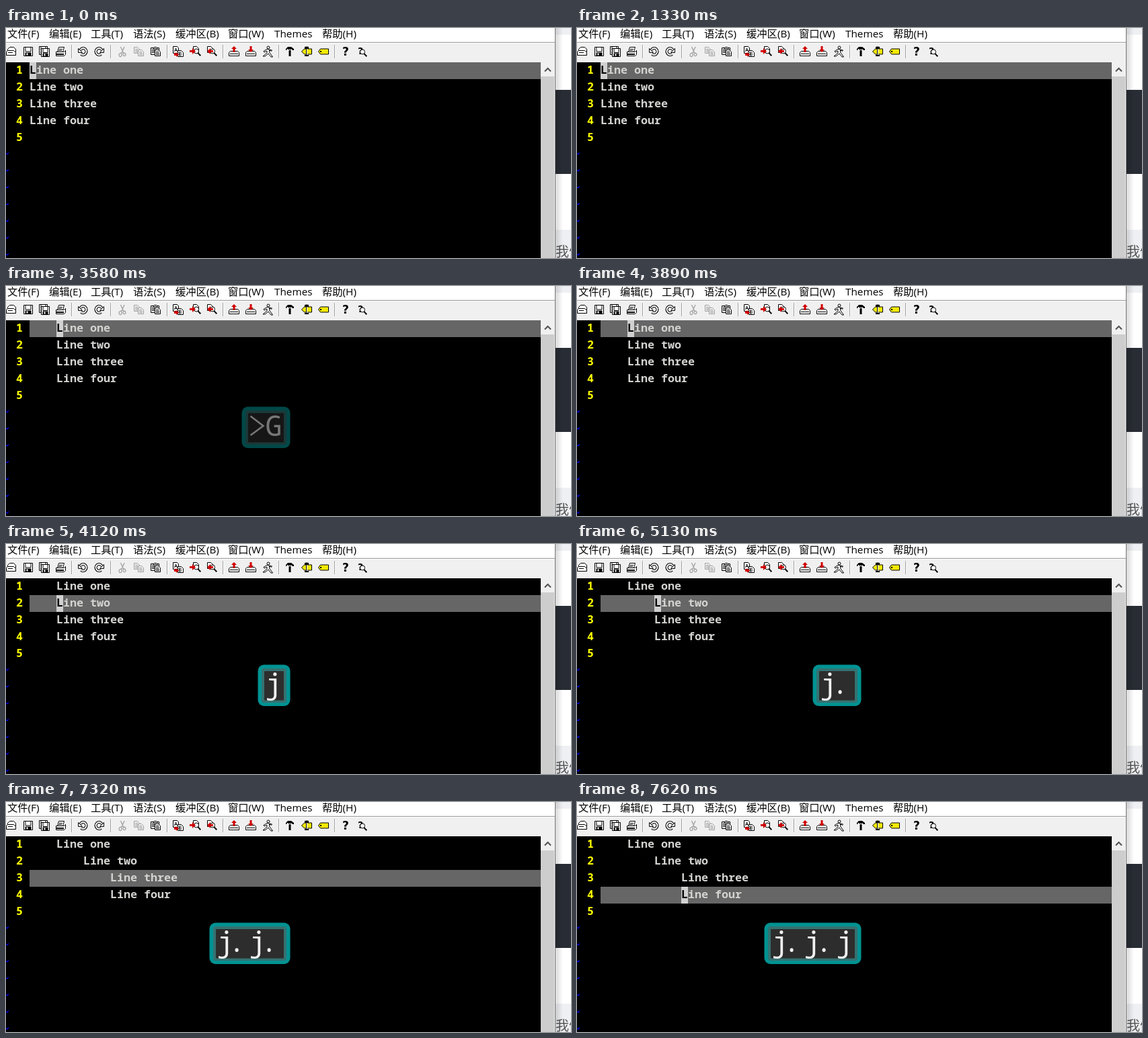
Animation, 840 px wide and 342 px high, one loop 8 s. Source, as an HTML page with a canvas:

```html
<!DOCTYPE html>
<html lang="zh">
<head>
<meta charset="utf-8">
<style>
html, body { margin: 0; width: 100%; height: 100%; overflow: hidden; background: #000; }
canvas { display: block; }
</style>
</head>
<body>
<canvas id="stage" width="840" height="342"></canvas>
<script>
const ctx = document.getElementById('stage').getContext('2d');
const LOOP = 8000, COL = 10, ROW = 25, TOP = 51, LEFT = 35, RIGHT = 795;
const MONO = '"Noto Sans Mono", "DejaVu Sans Mono", monospace';
const UI = '"Open Sans", "Noto Sans CJK SC", "Noto Sans CJK JP", "Noto Sans CJK", sans-serif';
const LINES = ['Line one', 'Line two', 'Line three', 'Line four'];
const MENU = [[2, '文件(F)'], [64, '编辑(E)'], [126, '工具(T)'], [189, '语法(S)'],
  [252, '缓冲区(B)'], [330, '窗口(W)'], [399, 'Themes'], [470, '帮助(H)']];

const KEYS = [[1400, '>'], [2350, 'G'], [4120, 'j'], [5130, '.'], [5910, 'j'], [6610, '.'], [7620, 'j']];
const BLINKS = [[380, 610], [1080, 1330], [2100, 2350], [3050, 3280],
  [3660, 3890], [4810, 5060], [5830, 5910], [7320, 7540]];
const FADE = [[3280, .95], [3350, .83], [3430, .67], [3580, .5], [3660, .25], [3740, 0]];

function rect(x, y, w, h, color) {
  ctx.fillStyle = color;
  ctx.fillRect(x, y, w, h);
}

function text(str, x, y, font, color, align = 'left') {
  ctx.font = font;
  ctx.fillStyle = color;
  ctx.textAlign = align;
  ctx.fillText(str, x, y);
}

// Each part is [path, fill, stroke, width] in a 16 px box centred on x
function icon(x, ...parts) {
  ctx.save();
  ctx.translate(x - 8, 27);
  for (const [d, fill, stroke, width = 1] of parts) {
    const p = new Path2D(d);
    ctx.lineWidth = width;
    if (fill) { ctx.fillStyle = fill; ctx.fill(p); }
    if (stroke) { ctx.strokeStyle = stroke; ctx.stroke(p); }
  }
  ctx.restore();
}

function mirrored(x, ...parts) {
  ctx.save();
  ctx.translate(2 * x, 0);
  ctx.scale(-1, 1);
  icon(x, ...parts);
  ctx.restore();
}

const K = '#000', W = '#fff', R = '#d00000', Y = '#f4ea00', G = '#a0a0a0';
const sheet = (x, y) => `M${x} ${y}h5l3 3v6h-8z`;
const floppy = (x, y, s) => [
  [`M${x} ${y}h${s}v${s}h-${s}z`, W, K],
  [`M${x + 2.5} ${y}v${s / 2}h${s - 5}v-${s / 2}`, null, K],
  [`M${x + 2} ${y + s - 5}h${s - 4}v5h-${s - 4}z`, K],
  [`M${x + 4} ${y + s - 4}h2v3h-2z`, W]
];
const lens = (x, y) => [
  [`M${x} ${y}a3.5 3.5 0 1 0 7 0a3.5 3.5 0 1 0 -7 0z`, W, K],
  [`M${x + 5} ${y + 3}l1.5 -1l4 4l-1.5 1.5z`, K]
];
const tray = ['M.5 9.5l2-2h11l2 2v5h-15z', W, K];
const hook = 'M4.5 5.5q3-4 7-1.5q4 4 0 8q-3 2-6 0';
const turn = [[hook, null, K, 4], [hook, null, W, 1.8], ['M1.5 3.5v6h6z', W, K]];

function toolbar(pending) {
  const paste = pending ? G : K;
  icon(8, ['M2.5 7.5v-3l3-3h6l3 3v9', W, K], ['M.5 13.5v-5l2-2h9l3 3v4z', W, K],
    ['M3 9.5h7', null, K]);
  icon(33, ...floppy(1.5, 1.5, 13));
  icon(57, ...floppy(.5, .5, 12), ...floppy(3.5, 3.5, 12));
  icon(81, ['M3.5 8.5l2-7h8l-2 7z', W, K], ['M1.5 8.5h12l2-2v6l-2 2h-12z', W, K],
    ['M2 11h11v2h-11z', K], ['M6 4.5h5M5 6.5h5', null, K]);
  icon(114, ...turn);
  mirrored(139, ...turn);
  icon(173, ['M5.5 1l4 9M11 1l-4 9M4 11a2 2.5 0 1 0 3 2q0-2-1-3zM10 10a2 2.5 0 1 0 3 2q-1-2-3-2z', null, G, 1.3]);
  icon(198, [sheet(.5, 1.5), '#f0f0f0', G], [sheet(6.5, 5.5), '#f0f0f0', G],
    ['M2 4.5h4M2 6.5h4M2 8.5h4M8 8.5h4M8 10.5h5M8 12.5h5', null, G]);
  icon(223, ['M.5 2.5h12v10h-12z', '#f0f0f0', paste], ['M3.5 3.5l2-2h3l2 2z', W, paste],
    [sheet(6.5, 5.5), W, paste], ['M8 8.5h4M8 10.5h5M8 12.5h5M2 5.5h9M2 7.5h4M2 9.5h4', null, paste]);
  icon(256, ['M.5 .5h6l2 2v8h-8z', W, K], ['M2.5 8l2-5l2 5M3 6.5h3', null, K],
    ['M7.5 6.5h5l3 3v6h-8z', W, K], ['M9.5 9v5h2q2-1 0-2.5q2-1 0-2.500zM9.5 11.5h2', null, K],
    ['M2 10v4h3v2l4-3.5l-4-3.5v2h-1v-1z', R]);
  icon(281, [sheet(5.5, .5), W, K], ...lens(6.5, 7.5), ['M0 6h4v-3l5 4.5l-5 4.5v-3h-4z', R]);
  icon(306, [sheet(1.5, .5), W, K], ...lens(5.5, 7.5), ['M10 6h-4v-3l-5 4.5l5 4.5v-3h4z', R]);
  icon(339, tray, ['M2 11.5h12', null, K], ['M8 0l4 4h-2.5v5h-3v-5h-2.5z', R]);
  icon(364, tray, ['M2 11.5h12', null, K], ['M8 9l4-4h-2.5v-5h-3v5h-2.5z', R]);
  icon(389, ['M7 2a2 2 0 1 0 4 0a2 2 0 1 0-4 0z', W, K],
    ['M7 4.5l-5 3l1 1.500l4-2v3l-6 5h3l5-4l4 5h2.500l-5-7v-3l3 1.500l1-1.500z', W, K]);
  icon(422, ['M2 4l3-3h5l4 3v2h-2l-2-2v1h-5v-1h-1l-1 2h-1z', K], ['M6.5 6h3v9h-3z', K]);
  icon(447, ['M.5 8l4-4h11v8h-11z', Y, K], ['M5 1q3-1 6 0v3h-2v9h2v2h-6v-2h2v-9h-2z', K],
    ['M8.5 4v9', null, W]);
  icon(472, ['M.5 8l3-4h12v8h-12z', Y, K], ['M3 7h2v2h-2z', K]);
  text('?', 505, 41, 'bold 17px "DejaVu Sans", sans-serif', K, 'center');
  text('?', 527, 39, 'bold 14px "DejaVu Sans", sans-serif', K, 'center');
  icon(530, ...lens(4.5, 8.5));
  for (const x of [97, 155, 239, 322, 405, 488]) {
    rect(x, 25, 1, 20, G);
    rect(x + 1, 25, 1, 20, W);
  }
}

function chrome(pending) {
  rect(0, 0, 816, 20, W);
  rect(0, 20, 816, 31, '#f0f0f0');
  rect(0, 21, 816, 1, G);
  rect(0, 22, 816, 1, W);
  for (const [x, label] of MENU) text(label, x, 14, '15.3px ' + UI, K);
  toolbar(pending);

  rect(RIGHT, TOP, 21, 291, '#f0f0f0');
  rect(RIGHT, 72, 20, 270, '#cdcdcd');
  ctx.strokeStyle = '#505050';
  ctx.lineWidth = 2;
  ctx.stroke(new Path2D('M801 64.5l4.5-4.5l4.5 4.5'));

  rect(816, 0, 24, 342, W);
  rect(816, 0, 24, 10, '#eff0f3');
  rect(816, 92, 24, 125, '#282c34');
  rect(816, 300, 24, 42, '#eff0f3');
  text('我们', 817, 340, '20px "Noto Sans CJK SC", "Noto Sans CJK JP", sans-serif', '#555');
  const shade = ctx.createLinearGradient(816, 0, 828, 0);
  shade.addColorStop(0, 'rgba(0,0,0,.16)');
  shade.addColorStop(1, 'rgba(0,0,0,0)');
  ctx.fillStyle = shade;
  ctx.fillRect(816, 0, 12, 342);
  rect(816, 0, 1, 342, '#777');
}

function editor(row, indents, pending, lit) {
  const font = 'bold 16.67px ' + MONO, ink = '#d3d3d0';
  rect(0, TOP, RIGHT, 291, K);
  rect(LEFT, TOP + row * ROW, RIGHT - LEFT, ROW, '#666');
  for (let i = 0; i < 12; i++) {
    const base = TOP + i * ROW + 17;
    if (i < 5) text(i + 1, 15, base, font, '#ff0');
    else text('~', -5, base, font, '#00f');
    if (i < 4) text(LINES[i], LEFT + indents[i] * 4 * COL, base, font, ink);
  }
  if (!lit) return;
  const x = LEFT + indents[row] * 4 * COL, y = TOP + row * ROW;
  if (pending) {
    rect(x, y + 12, COL, 13, '#d0d0d0');
  } else {
    rect(x, y, COL, ROW, '#d0d0d0');
    text(LINES[row][0], x, y + 17, font, K);
  }
}

function panel(x, y, w, h, r, color) {
  ctx.fillStyle = color;
  ctx.beginPath();
  ctx.roundRect(x, y, w, h, r);
  ctx.fill();
}

function keycast(keys, alpha) {
  if (!keys || !alpha) return;
  const w = 24 + keys.length * 24, x = 422.5 - w;
  panel(x, 179.5, w, 61.5, 9, '#009292');
  panel(x + 5.5, 185, w - 11, 51, 4, '#357272');
  panel(x + 9.5, 189, w - 19, 43.5, 1, '#2d2d2d');
  [...keys].forEach((key, i) => {
    const cell = x + 11.5 + i * 24;
    if (key === '>') {
      ctx.strokeStyle = '#f0f0f0';
      ctx.lineWidth = 2.6;
      ctx.stroke(new Path2D(`M${cell + 1.5} 193.5l19 14.5l-19 14`));
    } else {
      text(key, cell + (key === '.' ? 5 : 12), 223, '42px ' + MONO, '#f0f0f0', 'center');
    }
  });
  // Dim the whole box at once against the black editor
  rect(x - 1, 178, w + 2, 65, `rgba(0,0,0,${1 - alpha})`);
}

function draw(t) {
  let row = 0, shown = '', last = '';
  const indents = [0, 0, 0, 0];
  for (const [at, key] of KEYS) {
    if (at > t) break;
    if (key === 'j') row++;
    if (key === 'G' || key === '.') for (let i = row; i < 4; i++) indents[i]++;
    shown = last === 'G' ? key : shown + key;
    last = key;
  }
  const pending = last === '>';
  const lit = !BLINKS.some(([a, b]) => t >= a && t < b);
  let alpha = 1;
  if (t < 4120) for (const [at, a] of FADE) if (t >= at) alpha = a;

  editor(row, indents, pending, lit);
  chrome(pending);
  keycast(shown, alpha);
}

const start = performance.now();
function tick() {
  draw((performance.now() - start) % LOOP);
  requestAnimationFrame(tick);
}
tick();
</script>
</body>
</html>
```
